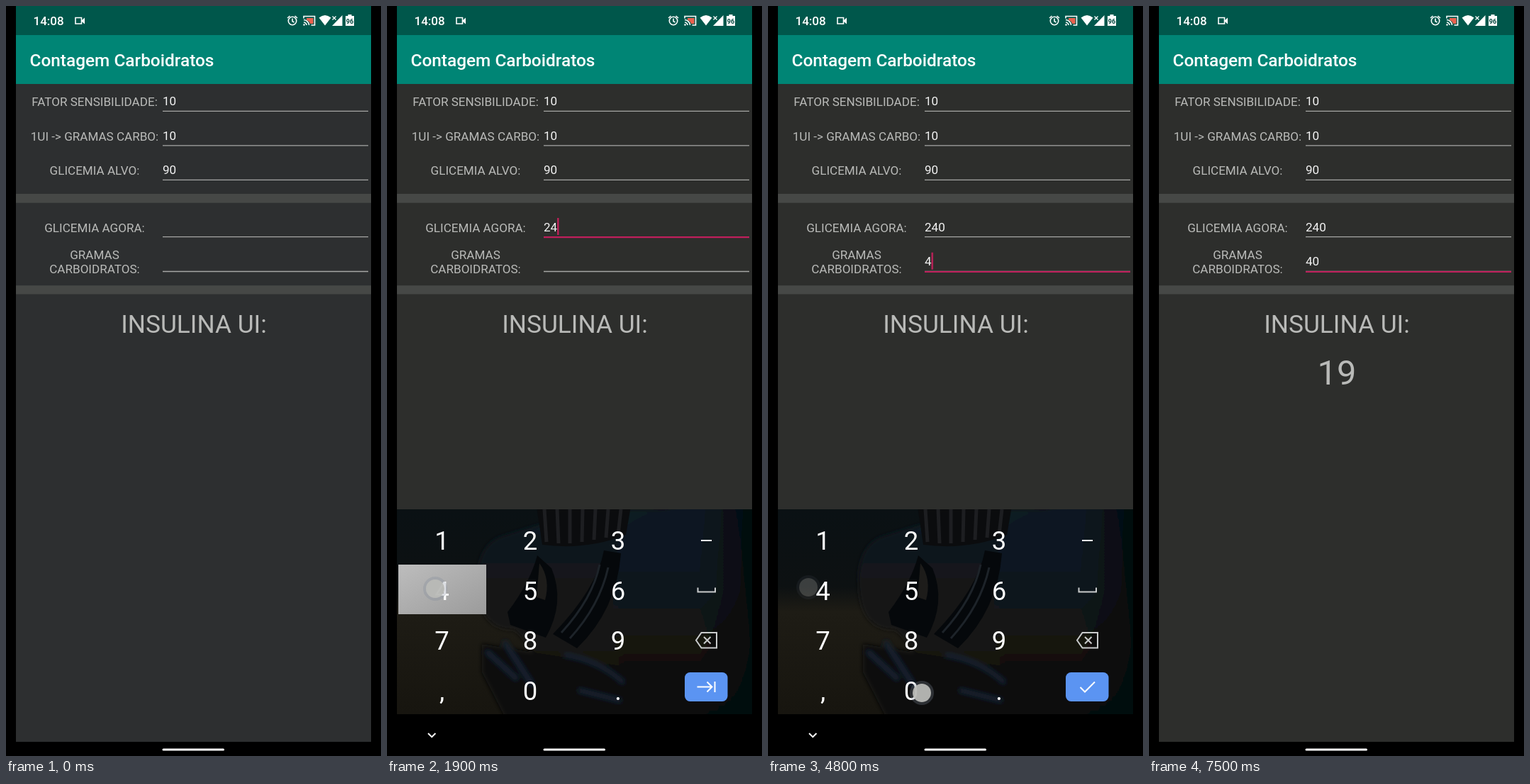
Recreate the animation shown at these times as an HTML page. Size 529 by 1058 pixels, loop 8000 ms.

```html
<!DOCTYPE html>
<html lang="pt">
<head>
<meta charset="utf-8">
<title>Contagem Carboidratos</title>
<style>
html, body { margin: 0; width: 100%; height: 100%; overflow: hidden; background: #000; }
svg { display: block; width: 529px; height: 1058px; font-family: Roboto, "Noto Sans", sans-serif; }
.label { font-size: 17.07px; fill: #b9bab8; text-anchor: middle; }
.value { font-size: 17.07px; fill: #f3f3f3; }
.keys { font-size: 36.5px; fill: #fff; text-anchor: middle; }
.line { fill: none; stroke: #fff; stroke-width: 2; }
.icon { fill: none; stroke: #fff; stroke-width: 1.6; }
.rule { stroke: #a6a7a5; stroke-width: 1.3; }
.focus { stroke: #c01f5c; stroke-width: 2.2; }
.caret { fill: #c9205d; }

/* Everything shares one 8 s clock; steps fall 20 ms ahead of each tick */
.step { animation: 8s step-end infinite; }
.bg { animation-name: bg; }
.g2 { animation-name: g2; } .g4 { animation-name: g4; } .g0 { animation-name: g0; }
.c4 { animation-name: c4; } .c0 { animation-name: c0; }
.result { animation-name: result; }
.focus1 { animation-name: focus1; } .focus2 { animation-name: focus2; }
.caret1 { animation-name: caret1; } .caret2 { animation-name: caret2; }
.next { animation-name: next; } .done { animation-name: done; }
.hide { animation-name: hide; }
.board { animation: board 8s linear infinite; }
.tap, .press { opacity: 0; animation: tap 8s linear infinite; animation-delay: calc(var(--t) - 8s); }
.press { animation-name: press; animation-timing-function: step-end; }

@keyframes bg { 0% { fill: #2d2f30; } 9.75%, 100% { fill: #2d2e2c; } }
@keyframes g2 { 0% { fill-opacity: 0; } 21%, 100% { fill-opacity: 1; } }
@keyframes g4 { 0% { fill-opacity: 0; } 23.5%, 100% { fill-opacity: 1; } }
@keyframes g0 { 0% { fill-opacity: 0; } 34.75%, 100% { fill-opacity: 1; } }
@keyframes c4 { 0% { fill-opacity: 0; } 58.5%, 100% { fill-opacity: 1; } }
@keyframes c0 { 0% { fill-opacity: 0; } 62.25%, 100% { fill-opacity: 1; } }
@keyframes result { 0% { opacity: 0; } 77.25%, 100% { opacity: 1; } }
@keyframes focus1 { 0% { opacity: 0; } 9.75% { opacity: 1; } 44.75%, 100% { opacity: 0; } }
@keyframes focus2 { 0% { opacity: 0; } 44.75%, 100% { opacity: 1; } }
@keyframes next { 0% { opacity: 1; } 46%, 100% { opacity: 0; } }
@keyframes done { 0% { opacity: 0; } 46%, 100% { opacity: 1; } }
@keyframes hide { 0% { opacity: 0; } 11% { opacity: 1; } 77.25%, 100% { opacity: 0; } }
@keyframes caret1 {
  0% { opacity: 0; transform: none; }
  11% { opacity: 1; transform: none; }
  17.25% { opacity: 0; transform: none; }
  21% { opacity: 1; transform: translateX(9.6px); }
  23.5% { opacity: 1; transform: translateX(19.2px); }
  29.75% { opacity: 0; transform: translateX(19.2px); }
  34.75% { opacity: 1; transform: translateX(28.8px); }
  41%, 100% { opacity: 0; transform: translateX(28.8px); }
}
@keyframes caret2 {
  0% { opacity: 0; transform: none; }
  44.75% { opacity: 1; transform: none; }
  51% { opacity: 0; transform: none; }
  57.25% { opacity: 1; transform: none; }
  58.5% { opacity: 1; transform: translateX(9.6px); }
  62.25% { opacity: 1; transform: translateX(19.2px); }
  68.5% { opacity: 0; transform: translateX(19.2px); }
  74.75% { opacity: 1; transform: translateX(19.2px); }
  81% { opacity: 0; transform: translateX(19.2px); }
  87.25% { opacity: 1; transform: translateX(19.2px); }
  93.5%, 100% { opacity: 0; transform: translateX(19.2px); }
}
@keyframes board {
  0%, 9.75% { opacity: 0; transform: translateY(35px); }
  12.25%, 77.25% { opacity: 1; transform: none; }
  78.75% { opacity: .8; transform: translateY(21px); }
  80.25%, 100% { opacity: 0; transform: translateY(48px); }
}
@keyframes tap {
  0%, 1.5% { opacity: .95; }
  2.75% { opacity: .28; }
  3.75%, 100% { opacity: 0; }
}
@keyframes press { 0% { opacity: 1; } 1.25%, 100% { opacity: 0; } }
</style>
</head>
<body>
<svg viewBox="0 0 529 1058">
  <defs>
    <g id="dot">
      <circle r="15" fill="none" stroke="#7d8798" stroke-opacity=".3" stroke-width="4"/>
      <circle r="13" fill="#b9bab7"/>
    </g>
    <linearGradient id="shine" x2="1" y2="1">
      <stop offset="0" stop-color="#bdbdbd"/><stop offset="1" stop-color="#9b9b9b"/>
    </linearGradient>
    <linearGradient id="field" x2="0" y2="1">
      <stop offset="0" stop-color="#0a1114"/><stop offset=".38" stop-color="#0d1112"/>
      <stop offset=".5" stop-color="#1e1c15"/><stop offset="1" stop-color="#17150f"/>
    </linearGradient>
    <linearGradient id="tube" x2="0" y2="1">
      <stop offset="0" stop-color="#101b23"/><stop offset=".45" stop-color="#131516"/>
      <stop offset=".75" stop-color="#191510"/><stop offset="1" stop-color="#07090b"/>
    </linearGradient>
    <linearGradient id="bell" x2="0" y2="1">
      <stop offset="0" stop-color="#0b1822"/><stop offset=".4" stop-color="#10181f"/>
      <stop offset=".65" stop-color="#15130f"/><stop offset="1" stop-color="#06080a"/>
    </linearGradient>
    <linearGradient id="edge">
      <stop offset="0" stop-color="#03070a" stop-opacity="0"/><stop offset="1" stop-color="#03070a"/>
    </linearGradient>
    <filter id="soft" x="-10%" y="-10%" width="120%" height="120%"><feGaussianBlur stdDeviation="3"/></filter>
    <clipPath id="pane"><path d="M14 710h501v289H14z"/></clipPath>
  </defs>

  <rect width="529" height="1058"/>
  <rect class="step bg" x="14" y="41" width="501" height="997" fill="#2d2e2c"/>
  <rect x="14" width="501" height="41" fill="#00574b"/>
  <rect x="14" y="41" width="501" height="69" fill="#008575"/>

  <!-- status bar -->
  <g fill="#fff">
    <text x="38.5" y="27" font-size="17" font-weight="500">14:08</text>
    <path class="icon" d="M98 16.5h8.5v8.5H98z"/>
    <path d="M107 20l4-3.500v9l-4-3.500z"/>
    <circle class="icon" cx="404" cy="21" r="5.700"/>
    <path class="icon" d="M404 17.500v4l2.500 1.500M397 17l3.500-3M411 17l-3.500-3"/>
    <path d="M424 17h9.500v8H429a7 7 0 0 0-5-5z" fill="#e8614e"/>
    <path class="icon" d="M420 17.500V14.500h15.500v12.500h-5M420 19.500a8 8 0 0 1 7.500 7.500M420 23a4.500 4.500 0 0 1 4 4"/>
    <circle cx="420.500" cy="26.500" r="1.200"/>
    <path d="M441.500 16.500q8.500-7 17 0L450 27.500z"/>
    <path d="M474.500 13v15H460z"/>
    <path d="M460 14l6 6M466 14l-6 6" stroke="#00574b" stroke-width="4"/>
    <path d="M460.500 14.500l5 5M465.500 14.500l-5 5" stroke="#fff" stroke-width="1.300"/>
    <path d="M479 14h3.500v-2h5v2h3.500v14h-12z"/>
    <text x="485" y="24.500" font-size="9" font-weight="700" text-anchor="middle" fill="#00473e">96</text>
  </g>
  <text x="33.500" y="85" font-size="24.400" font-weight="500" fill="#fff">Contagem Carboidratos</text>

  <!-- form -->
  <path d="M14 265h501v12.800H14zM14 394.300h501v12.200H14z" fill="#464846"/>
  <g class="label">
    <text x="125" y="140.500">FATOR SENSIBILIDADE:</text>
    <text x="125" y="189.500">1UI -&gt; GRAMAS CARBO:</text>
    <text x="125" y="238">GLICEMIA ALVO:</text>
    <text x="125" y="318.500">GLICEMIA AGORA:</text>
    <text x="125" y="357">GRAMAS</text>
    <text x="125" y="377">CARBOIDRATOS:</text>
    <text x="265" y="460.500" font-size="35.300" style="font-size:35.3px">INSULINA UI:</text>
    <text class="step result" x="265" y="533.500" style="font-size:48.8px">19</text>
  </g>
  <path class="rule" d="M221 148.300h290M221 196.800h290M221 245.300h290M221 325.700h290M221 374.500h290"/>
  <path class="step focus focus1" d="M221 326.200h290"/>
  <path class="step focus focus2" d="M221 375h290"/>
  <g class="value">
    <text x="221" y="140">10</text>
    <text x="221" y="188.700">10</text>
    <text x="221" y="237.300">90</text>
    <text x="221" y="317.700"><tspan class="step g2">2</tspan><tspan class="step g4">4</tspan><tspan class="step g0">0</tspan></text>
    <text x="221" y="366.300"><tspan class="step c4">4</tspan><tspan class="step c0">0</tspan></text>
  </g>
  <rect class="step caret caret1" x="221" y="299" width="2.200" height="24"/>
  <rect class="step caret caret2" x="221" y="347.700" width="2.200" height="24"/>

  <!-- keyboard -->
  <g class="board">
    <rect x="14" y="710" width="501" height="348"/>
    <g clip-path="url(#pane)">
      <rect x="14" y="710" width="501" height="289" fill="url(#field)"/>
      <g filter="url(#soft)">
        <path d="M128 800q4-42 34-52l80-24 100-14h190v300H240q-8-80-60-130-56 2-52-80z" fill="url(#tube)"/>
        <path d="M330 740q40-36 100-34h100v300H350q-50-130-20-266z" fill="url(#bell)"/>
        <path d="M134 900l60 10 130 20 40 80H170l-36-70z" fill="#080b0f"/>
        <path d="M140 910l44 40M165 896l40 62" stroke="#182430" stroke-width="7"/>
        <path d="M250 915q50 8 84 40M270 965l60 15" fill="none" stroke="#172431" stroke-width="6"/>
        <rect x="440" y="700" width="90" height="310" fill="url(#edge)"/>
      </g>
      <path d="M210 700h135l-8 46q-55 22-118 14z" fill="#0b0c0e"/>
      <path d="M222 710l3 46M240 710l2 48M258 710v48M276 710l-1 46M294 710l-2 43M312 710l-3 40M330 710l-4 36" stroke="#1d1e21" stroke-width="5"/>
      <path d="M212 775q-10 38-42 80l4 18 50 18q28-50 8-98z" fill="#05080b"/>
      <path d="M306 768q-10 54-72 118l34 20q56-54 62-134z" fill="#05080b"/>
      <path d="M300 788q-10 48-54 96M312 792q-12 54-54 100" fill="none" stroke="#1d2329" stroke-width="3"/>
      <path d="M215 786q16 22 8 52l-12-4z" fill="#1d1c1a"/>
    </g>
    <g fill="url(#shine)">
      <rect class="press" style="--t:1.68s" x="140" y="718" width="124" height="70"/>
      <rect class="press" style="--t:1.88s" x="16" y="788" width="124" height="70"/>
      <rect class="press" style="--t:2.68s" x="140" y="928.500" width="124" height="70.500"/>
      <rect class="press" style="--t:4.68s" x="16" y="788" width="124" height="70"/>
      <rect class="press" style="--t:4.88s" x="140" y="928.500" width="124" height="70.500"/>
    </g>
    <g class="keys">
      <text y="767"><tspan x="77.500">1</tspan><tspan x="202">2</tspan><tspan x="326">3</tspan></text>
      <text y="837.500"><tspan x="77.500">4</tspan><tspan x="202">5</tspan><tspan x="326">6</tspan></text>
      <text y="908"><tspan x="77.500">7</tspan><tspan x="202">8</tspan><tspan x="326">9</tspan></text>
      <text y="978.500"><tspan x="77.500">,</tspan><tspan x="202">0</tspan><tspan x="326">.</tspan></text>
    </g>
    <path class="line" stroke-width="2.600" d="M443 754h15"/>
    <g class="line" style="stroke:#c9cbcc">
      <path d="M438.500 820.500v6h24.500v-6"/>
      <path d="M443.500 884h21.500v21.500h-21.500l-7.500-10.750zM447 890l9.500 9.500M456.500 890l-9.500 9.500"/>
    </g>
    <rect x="420" y="940" width="60.500" height="41" rx="7.500" fill="#5b94f2"/>
    <path class="step line next" d="M437.500 960.500h20.500M451.500 953.500l7 7-7 7M462.500 953v15"/>
    <path class="step line done" d="M440.500 961l6.500 6.500 14-14"/>
    <path class="step line hide" d="M58 1026l5.200 5.200 5.200-5.200"/>
  </g>

  <rect x="14" y="1038" width="501" height="20" fill-opacity="0"/>
  <rect x="220.500" y="1047.500" width="87.500" height="3" rx="1.500" fill="#fff"/>

  <!-- touches -->
  <use class="tap" style="--t:.68s" href="#dot" x="372" y="313"/>
  <use class="tap" style="--t:1.58s" href="#dot" x="208" y="756"/>
  <use class="tap" style="--t:1.78s" href="#dot" x="68" y="822"/>
  <use class="tap" style="--t:2.58s" href="#dot" x="209" y="967"/>
  <use class="tap" style="--t:3.58s" href="#dot" x="370" y="363"/>
  <use class="tap" style="--t:4.58s" href="#dot" x="57" y="820"/>
  <use class="tap" style="--t:4.78s" href="#dot" x="217" y="969"/>
  <use class="tap" style="--t:6.08s" href="#dot" x="448" y="566"/>
</svg>
</body>
</html>
```
